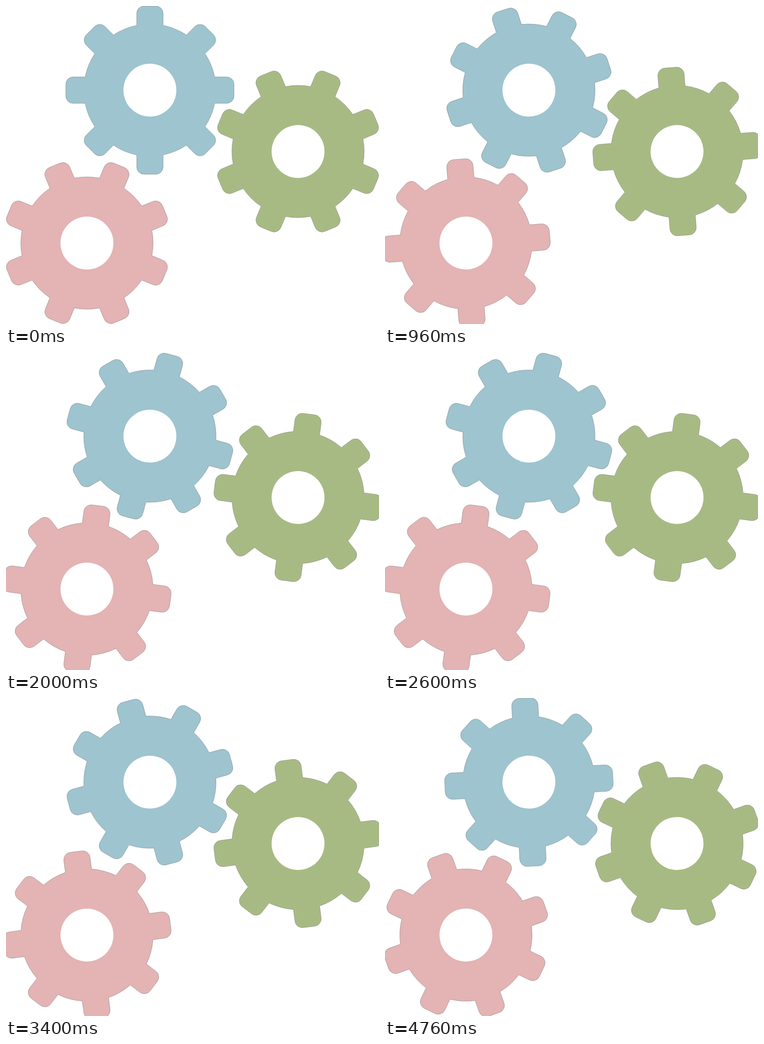
An HTML page for the animation above (4800 ms loop, 705 px wide and 601 px high).

```html
<!DOCTYPE html>
<html lang="en">
<head>
<meta charset="utf-8">
<title>Gears</title>
<style>
  html, body { margin: 0; width: 100%; height: 100%; overflow: hidden; background: #fff; }
  svg { display: block; width: 705px; height: 601px; }
  path { stroke: #7d7d7d; stroke-opacity: .65; stroke-width: .8; }
</style>
</head>
<body>
<svg id="stage" viewBox="0 0 705 601" xmlns="http://www.w3.org/2000/svg"></svg>
<script>
const NS = 'http://www.w3.org/2000/svg';
const TEETH = 8, RIM = 125, TIP = 159, HALF = 25, CORNER = 14, HOLE = 50;
const FRAME = 40, FRAMES = 120, STEP = 360 / FRAMES;

const gears = [
  { x: 272, y: 159, phase: 0, dir: 1, fill: '#9dc4cf' },
  { x: 552, y: 275, phase: 22.5, dir: -1, fill: '#a8ba84' },
  { x: 153, y: 448, phase: 22.5, dir: -1, fill: '#e4b3b4' }
];

function gearPath() {
  const base = Math.sqrt(RIM * RIM - HALF * HALF);
  let d = '';
  for (let i = 0; i < TEETH; i++) {
    const a = i * 2 * Math.PI / TEETH, c = Math.cos(a), s = Math.sin(a);
    // u runs across the tooth, r outward from the hub
    const pt = (u, r) => `${(u * c + r * s).toFixed(3)} ${(u * s - r * c).toFixed(3)}`;
    const arc = (rad, u, r) => `A${rad} ${rad} 0 0 1 ${pt(u, r)}`;
    d += (i ? arc(RIM, -HALF, base) : 'M' + pt(-HALF, base)) +
      'L' + pt(-HALF, TIP - CORNER) + arc(CORNER, CORNER - HALF, TIP) +
      'L' + pt(HALF - CORNER, TIP) + arc(CORNER, HALF, TIP - CORNER) +
      'L' + pt(HALF, base);
  }
  return d + `A${RIM} ${RIM} 0 0 1 ${-HALF} ${-base}Z`;
}

function add(parent, tag, attrs) {
  const el = document.createElementNS(NS, tag);
  for (const k in attrs) el.setAttribute(k, attrs[k]);
  return parent.appendChild(el);
}

const stage = document.getElementById('stage');
const outline = gearPath();
for (const g of gears) {
  g.el = add(stage, 'g', {});
  add(g.el, 'path', { d: outline, fill: g.fill });
  add(g.el, 'circle', { r: HOLE, fill: '#fff' });
}

function draw(ms) {
  const turn = Math.floor(ms / FRAME) % FRAMES * STEP;
  for (const g of gears) {
    g.el.setAttribute('transform', `translate(${g.x} ${g.y}) rotate(${g.phase + g.dir * turn})`);
  }
}

const start = performance.now();
function tick() {
  draw(performance.now() - start);
  requestAnimationFrame(tick);
}
tick();
</script>
</body>
</html>
```
